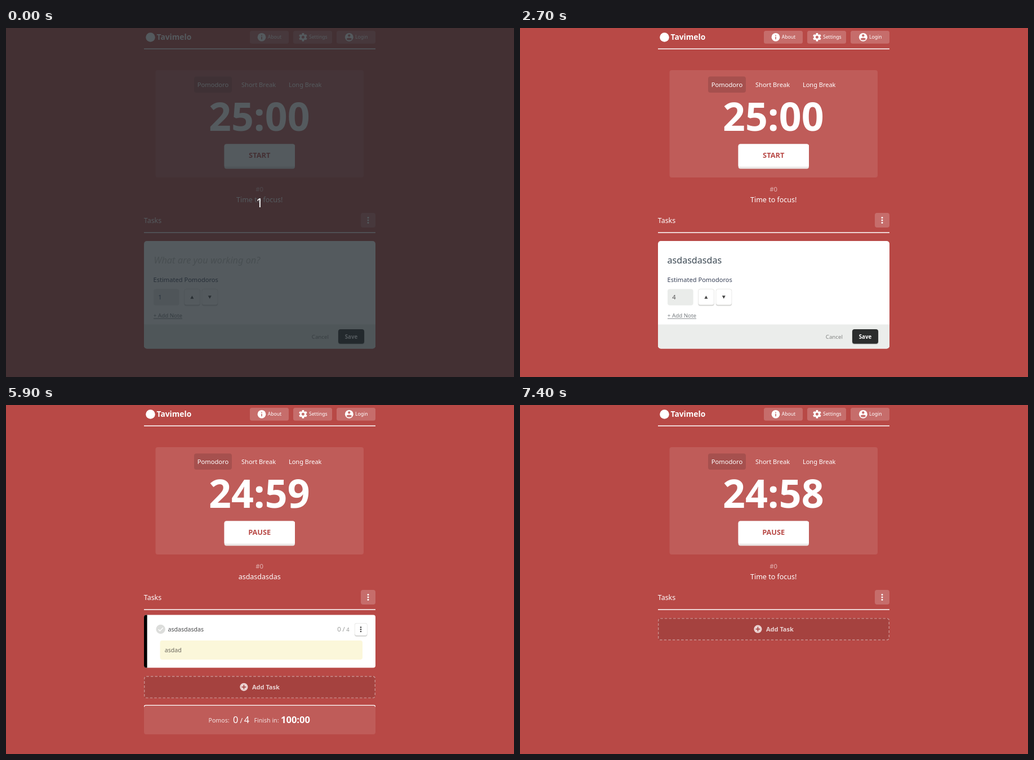
Write an HTML page with a canvas that moves like this. It is 902 px wide and 621 px high and loops after 8 s.

```html
<!DOCTYPE html>
<html lang="en">
<head>
<meta charset="utf-8">
<title>Focus timer</title>
<style>
html, body { margin: 0; width: 100%; height: 100%; overflow: hidden; background: #b84946; }
canvas { display: block; width: 902px; height: 621px; }
</style>
</head>
<body>
<canvas id="stage" width="902" height="621"></canvas>
<script>
const ctx = document.getElementById('stage').getContext('2d');
const W = 902, H = 621, LOOP = 8000;
const RED = '#b84946', WHITE = '#fff', FIELD = '#eaecea';
const GLASS = 'rgba(255,255,255,.1)', BUTTON = 'rgba(255,255,255,.2)';
const TASK = 'asdasdasdas', NOTE = 'asdad';

function text(str, x, y, size, color = WHITE, weight = 400, align = 'left', style = '') {
  ctx.font = `${style} ${weight} ${size}px "Noto Sans", "Open Sans", sans-serif`;
  ctx.textAlign = align;
  ctx.fillStyle = color;
  ctx.fillText(str, x, y);
}

function rect(x, y, w, h, color) {
  ctx.fillStyle = color;
  ctx.fillRect(x, y, w, h);
}

function box(x, y, w, h, r, color) {
  ctx.beginPath();
  ctx.roundRect(x, y, w, h, r);
  ctx.fillStyle = color;
  ctx.fill();
}

function dot(x, y, r, color = WHITE) {
  ctx.beginPath();
  ctx.arc(x, y, r, 0, Math.PI * 2);
  ctx.fillStyle = color;
  ctx.fill();
}

function line(points, color, width) {
  ctx.beginPath();
  points.forEach(([x, y]) => ctx.lineTo(x, y));
  ctx.strokeStyle = color;
  ctx.lineWidth = width;
  ctx.stroke();
}

function shape(points, color) {
  ctx.beginPath();
  points.forEach(([x, y]) => ctx.lineTo(x, y));
  ctx.fillStyle = color;
  ctx.fill();
}

function dots(x, y, gap, r, color) {
  for (const i of [-1, 0, 1]) dot(x, y + i * gap, r, color);
}

// Small white button with a soft lower edge
function raised(x, y, w, h) {
  box(x - .5, y - .5, w + 1, h + 2.5, 4, '#d5d5d3');
  box(x, y, w, h, 3.5, WHITE);
}

function caret(x, y, h) {
  rect(x, y, 1, h, '#444');
}

function infoIcon(x, y) {
  dot(x, y, 7.4);
  rect(x - .8, y - .8, 1.6, 4.7, '#c66d6b');
  rect(x - .8, y - 3.8, 1.6, 1.6, '#c66d6b');
}

function gearIcon(x, y) {
  ctx.save();
  ctx.translate(x, y);
  dot(0, 0, 5.5);
  for (let i = 0; i < 6; i++) {
    ctx.rotate(Math.PI / 3);
    box(-1.9, -7.4, 3.8, 5, .8, WHITE);
  }
  dot(0, 0, 2.5, '#c66d6b');
  ctx.restore();
}

function userIcon(x, y) {
  dot(x, y, 7.4);
  dot(x, y - 2.9, 2.2, '#c66d6b');
  ctx.beginPath();
  ctx.ellipse(x, y + 3.3, 4.4, 2.2, 0, 0, Math.PI * 2);
  ctx.fill();
}

function header() {
  dot(256.5, 16.5, 8.3);
  text('Tavimelo', 267.5, 21, 13.8, WHITE, 700);
  for (const x of [433, 510, 587]) box(x, 5, 69, 22.7, 3.5, BUTTON);
  infoIcon(454, 16.3);
  gearIcon(527.4, 16.3);
  userIcon(609.3, 16.3);
  text('About', 464.8, 19.3, 8.6);
  text('Settings', 538, 19.3, 8.6);
  text('Login', 620, 19.3, 8.6);
  rect(245, 36.4, 411, 1.5, WHITE);
}

function timer(clock, action) {
  box(265.5, 75, 369.5, 191, 4, GLASS);
  box(334, 86.3, 67, 28.7, 4, 'rgba(0,0,0,.13)');
  text('Pomodoro', 367.5, 105, 11.2, WHITE, 500, 'center');
  text('Short Break', 448.5, 105, 11.1, WHITE, 400, 'center');
  text('Long Break', 531.2, 105, 11, WHITE, 400, 'center');
  text(clock, 449.8, 183.4, 69.8, WHITE, 700, 'center');
  box(387.6, 206.4, 125.4, 44.2, 4, '#ebe7e6');
  box(387.6, 206.4, 125.4, 40.4, [4, 4, 2, 2], WHITE);
  text(action, 450.2, 231.2, 12.8, RED, 700, 'center');
}

function taskHead(focus) {
  text('#0', 450.2, 290.5, 11.3, 'rgba(255,255,255,.6)', 400, 'center');
  text(focus, 450.2, 309.6, 12.5, WHITE, 500, 'center');
  text('Tasks', 244.8, 346.6, 12.4, WHITE, 500);
  box(630, 329, 26, 26, 4, BUTTON);
  dots(643, 342, 4.6, 1.5, WHITE);
  rect(245, 363.3, 411, 1.5, WHITE);
}

function cardFooter(top, hover) {
  box(245, top, 411, 43, [0, 0, 5, 5], '#ebedeb');
  text('Cancel', 542.8, top + 25, 9.7, '#838583');
  box(589.5, top + 9.2, 47, 26, 4, '#b9bbb9');
  box(590, top + 8.5, 46, 25.7, 4, hover ? '#474747' : '#2b2d2d');
  text('Save', 613, top + 25, 9.7, WHITE, 700, 'center');
}

function arrow(x, y, dir) {
  shape([[x - 3, y + 2.7 * dir], [x + 3, y + 2.7 * dir], [x, y - 2.7 * dir]], '#444');
}

function cardTitle(str) {
  if (str) text(str, 261.5, 418.6, 16.1, '#3b4853');
  else text('What are you working on?', 262.5, 418.6, 16.3, '#c9cac6', 400, 'left', 'italic');
}

function newCard(s) {
  const foot = s.noteOpen ? 559 : 527.5;
  box(245, 379, 411, foot + 43 - 379, 5, WHITE);
  cardTitle(s.title);
  if (s.caret) caret(262 + s.title.length * 8.75, 404, 19);
  text('Estimated Pomodoros', 261.5, 452, 11.1, '#394258', 500);
  box(262, 464.5, 45.6, 29, 4, FIELD);
  text(s.count, 270.3, 483, 11.2, s.count === 1 ? '#46587a' : '#555');
  if (s.spinner) {
    arrow(296, 477.5, .6);
    arrow(296, 483.5, -.6);
  }
  raised(316.8, 465, 27.5, 27.5);
  raised(348.2, 465, 27.5, 27.5);
  arrow(330.4, 479, 1);
  arrow(361.8, 479, -1);
  if (s.noteOpen) {
    box(262, 504.5, 376.5, 46, 4, FIELD);
    text(s.note || 'Some notes...', 270, 524, 9.4, s.note ? '#555' : '#a9aba9');
    if (s.noteCaret) caret(270 + s.note.length * 5.3, 514.5, 12);
    line([[632.5, 549.5], [638, 544]], '#777', .9);
    line([[635.5, 549.5], [638, 547]], '#777', .9);
  } else {
    text('+ Add Note', 261.8, 515.3, 9.75, '#757a7e');
    rect(262, 516.6, 51, .9, '#757a7e');
  }
  cardFooter(foot, s.saveHover);
}

function taskCard() {
  box(245, 373.5, 411, 94, 4, WHITE);
  box(245, 373.5, 5.6, 94, [4, 0, 0, 4], '#000');
  dot(274.6, 399, 8.2, '#dcdddb');
  line([[270.6, 399.3], [273.3, 402], [278.8, 396.3]], WHITE, 1.5);
  text(TASK, 287.5, 403, 10.6, '#48494a', 500);
  text('0 /', 588.2, 403, 11.3, '#989a98');
  text('4', 604.2, 403, 9.5, '#989a98');
  raised(619.4, 388.5, 21.6, 21.6);
  dots(630, 399.3, 3.7, 1.3, '#444');
  box(273.5, 419, 359.5, 34, 4, '#fbf7da');
  text(NOTE, 281.7, 440, 10.6, '#6b675c');
}

function editCard(withCaret) {
  box(245, 379, 411, 139.5, 5, WHITE);
  cardTitle(TASK);
  if (withCaret) caret(358, 404, 19);
  box(262, 436, 376.5, 31.5, 4, FIELD);
  text(NOTE, 270, 455.5, 9.4, '#555');
  cardFooter(476, false);
  text('Delete', 261.8, 501, 9.9, '#7b7d7b');
}

function addTask(y) {
  box(245, y, 411, 39.5, 4, 'rgba(0,0,0,.1)');
  ctx.beginPath();
  ctx.roundRect(245.7, y + .7, 409.6, 38.1, 3.5);
  ctx.setLineDash([4.6, 3]);
  ctx.strokeStyle = 'rgba(255,255,255,.4)';
  ctx.lineWidth = 1.4;
  ctx.stroke();
  ctx.setLineDash([]);
  const tint = 'rgba(255,255,255,.77)', mid = y + 19.5;
  dot(422.4, mid, 7.1, '#ead2d1');
  rect(418.6, mid - .8, 7.6, 1.6, '#a64240');
  rect(421.6, mid - 3.8, 1.6, 7.6, '#a64240');
  text('Add Task', 437, y + 23.5, 11, tint, 700);
}

function summary(y) {
  box(245, y, 411, 52.5, 4, GLASS);
  ctx.save();
  ctx.beginPath();
  ctx.rect(245, y, 411, 4);
  ctx.clip();
  ctx.beginPath();
  ctx.roundRect(244.6, y + .8, 411.8, 60, 4);
  ctx.strokeStyle = WHITE;
  ctx.lineWidth = 1.6;
  ctx.stroke();
  ctx.restore();
  const soft = 'rgba(255,255,255,.82)';
  text('Pomos:', 359.5, y + 31, 10.6, soft);
  text('0', 403, y + 32.5, 16.3);
  text('/', 415.5, y + 32, 12.5);
  text('4', 422.8, y + 32.5, 16.3);
  text('Finish in:', 440.5, y + 31, 10.6, soft);
  text('100:00', 488, y + 32.5, 16.5, WHITE, 700);
}

// Number of 100 ms steps done since start, from 0 to max
const steps = (t, start, max) =>
  Math.max(0, Math.min(max, Math.floor((t - start) / 100) + 1));
const during = (t, a, b) => t >= a && t < b;

function draw(t) {
  rect(0, 0, W, H, RED);
  header();
  const clock = t < 5900 ? '25:00' : t < 7000 ? '24:59' : '24:58';
  timer(clock, t < 4900 ? 'START' : 'PAUSE');
  taskHead(during(t, 4100, 7400) ? TASK : 'Time to focus!');

  if (t < 4100) {
    newCard({
      title: TASK.slice(0, Math.ceil(steps(t, 1100, 7) * 11 / 7)),
      caret: during(t, 500, 2000),
      count: 1 + steps(t, 2400, 3),
      spinner: during(t, 2400, 2700),
      noteOpen: t >= 3100,
      note: NOTE.slice(0, Math.ceil(steps(t, 3500, 3) * 5 / 3)),
      noteCaret: during(t, 3300, 3700),
      saveHover: t >= 4000
    });
  } else if (t < 6100) {
    taskCard();
    addTask(482.3);
    summary(533.5);
  } else if (t < 7400) {
    editCard(during(t, 6500, 7100));
    addTask(533.5);
    summary(584.7);
  } else {
    addTask(379.2);
  }

  if (t < 100) {
    rect(0, 0, W, H, 'rgba(33,41,46,.77)');
    text('1', 450.2, 318.8, 22, WHITE, 400, 'center');
  }
}

const begin = performance.now();
function tick() {
  draw((performance.now() - begin) % LOOP);
  requestAnimationFrame(tick);
}
tick();
</script>
</body>
</html>
```
